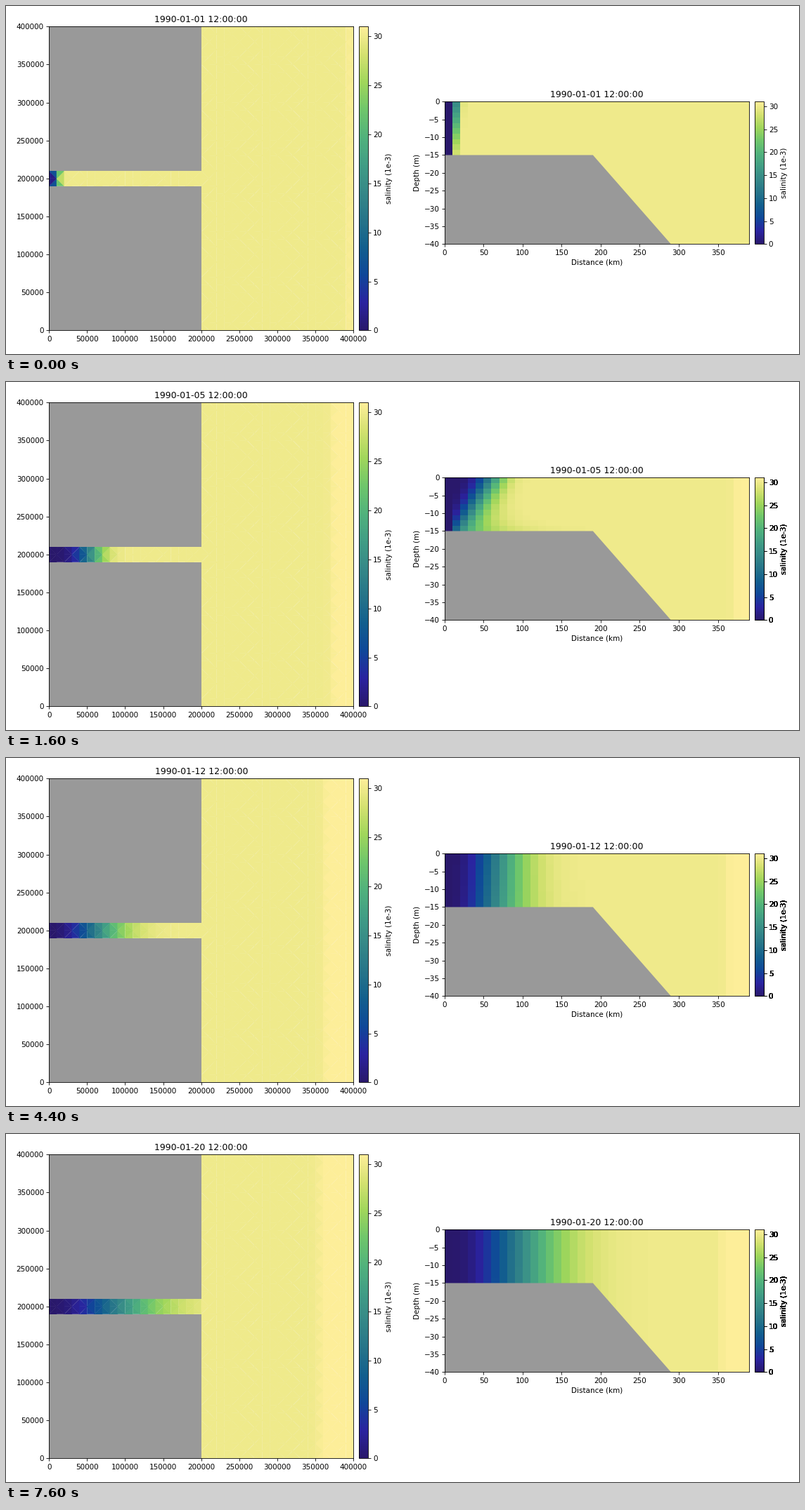
Recreate the animation shown at these times as a matplotlib script. Size 1128x496 px, loop 8000 ms.

```python
import numpy as np
import matplotlib.pyplot as plt
from matplotlib.animation import FuncAnimation
from matplotlib.cm import ScalarMappable
from matplotlib.collections import PolyCollection
from matplotlib.colors import LinearSegmentedColormap, Normalize

W, H, DPI = 1128, 496, 75
FRAMES, INTERVAL = 20, 400
LAND = "#999999"
SEA_SALT = 30

HALINE = LinearSegmentedColormap.from_list("haline", [
    "#29186b", "#2a23a0", "#0f4799", "#125f8e", "#267489", "#358888",
    "#419d85", "#51b27c", "#6fc66b", "#a0d65b", "#d4e170", "#fdee99"])
NORM = Normalize(0, 31)


def river(day, km, depth=0):
    """Salinity of the fresh plume; depth runs from 0 (surface) to 1 (bed)."""
    middle = 20 * (1 - np.exp(-day / 1.5)) + 4 * day
    # Stratification builds up quickly, then mixes away.
    tilt = 1.3 * day**2 * np.exp(-day / 1.7) * (1 - 2 * depth)
    steepness = 2.25 + 0.7 * tilt
    return SEA_SALT * (1 - 0.5 ** ((km / (middle + 10 * tilt)) ** steepness))


def sea_rise(day, km):
    """Extra salt spreading inward from the open boundary at 400 km."""
    front = 400 - 30 * (1 - np.exp(-day / 2.5)) - 0.8 * day
    return 0.5 * (1 + np.tanh((km - front) / 5))


def add_axes(x0, y0, x1, y1):
    return fig.add_axes([x0 / W, 1 - y1 / H, (x1 - x0) / W, (y1 - y0) / H])


def add_bar(x0, y0, y1):
    cax = add_axes(x0, y0, x0 + 13, y1)
    fig.colorbar(ScalarMappable(NORM, HALINE), cax=cax,
                 ticks=range(0, 31, 5), label="salinity (1e-3)")
    return cax


def square_triangles(i, j):
    """Split one 10 km square along a diagonal that alternates."""
    x0, y0, x1, y1 = 10 * i, 10 * j, 10 * i + 10, 10 * j + 10
    a, b, c, d = (x0, y0), (x1, y0), (x1, y1), (x0, y1)
    return [(a, b, c), (a, c, d)] if (i + j) % 2 else [(a, b, d), (b, c, d)]


plt.rcParams["font.family"] = "DejaVu Sans"
fig = plt.figure(figsize=(W / DPI, H / DPI), dpi=DPI, facecolor="white")

# Plan view: a narrow channel opening into the sea.
plan = add_axes(61.2, 29.3, 494.3, 462.4)
squares = [(i, j) for i in range(40) for j in range(40)
           if i >= 20 or j in (19, 20)]
triangles = np.array([t for s in squares for t in square_triangles(*s)])
tri_km = triangles[:, :, 0].mean(axis=1)
mesh = PolyCollection(triangles * 1000, cmap=HALINE, norm=NORM,
                      edgecolors="face", linewidths=0.4)
plan.add_collection(mesh)
for bottom, top in ((0, 190e3), (210e3, 400e3)):
    plan.fill([0, 200e3, 200e3, 0], [bottom, bottom, top, top],
              color=LAND, lw=0)
plan.set(xlim=(0, 400e3), ylim=(0, 400e3), xticks=range(0, 400001, 50000),
         yticks=range(0, 400001, 50000))
add_bar(501.8, 29.3, 462.4)

# Section along the channel axis.
section = add_axes(623.8, 136.3, 1057, 339.4)
x_edges = np.arange(0, 391, 10)
z_edges = np.append(np.linspace(0, -15, 11), -40)
column_km = x_edges[:-1]
depth = np.minimum(np.arange(11) / 9, 1)[:, None]
cells = section.pcolormesh(x_edges, z_edges, np.zeros((11, 39)),
                           cmap=HALINE, norm=NORM)
section.fill([0, 190, 290, 0], [-15, -15, -40, -40], color=LAND, lw=0)
section.set(xlim=(0, 390), ylim=(-40, 0), xlabel="Distance (km)",
            ylabel="Depth (m)", xticks=range(0, 351, 50),
            yticks=range(-40, 1, 5))
# The bar is painted again each day, so its lettering grows heavier.
bars = [add_bar(1064.5, 136.3, 339.4) for _ in range(FRAMES)]

titles = [ax.set_title(" ") for ax in (plan, section)]


def update(n):
    day = n + 0.5
    mesh.set_array(np.where(tri_km < 200, river(day, tri_km),
                            SEA_SALT + sea_rise(day, tri_km)))
    cells.set_array(river(day, column_km, depth)
                    + sea_rise(day, column_km + 5))
    for title in titles:
        title.set_text(f"1990-01-{n + 1:02d} 12:00:00")
    for i, bar in enumerate(bars):
        bar.set_visible(i <= n)
    return [mesh, cells, *titles, *bars]


anim = FuncAnimation(fig, update, frames=FRAMES, interval=INTERVAL,
                     repeat=True, repeat_delay=0, blit=False)
plt.show()
```
